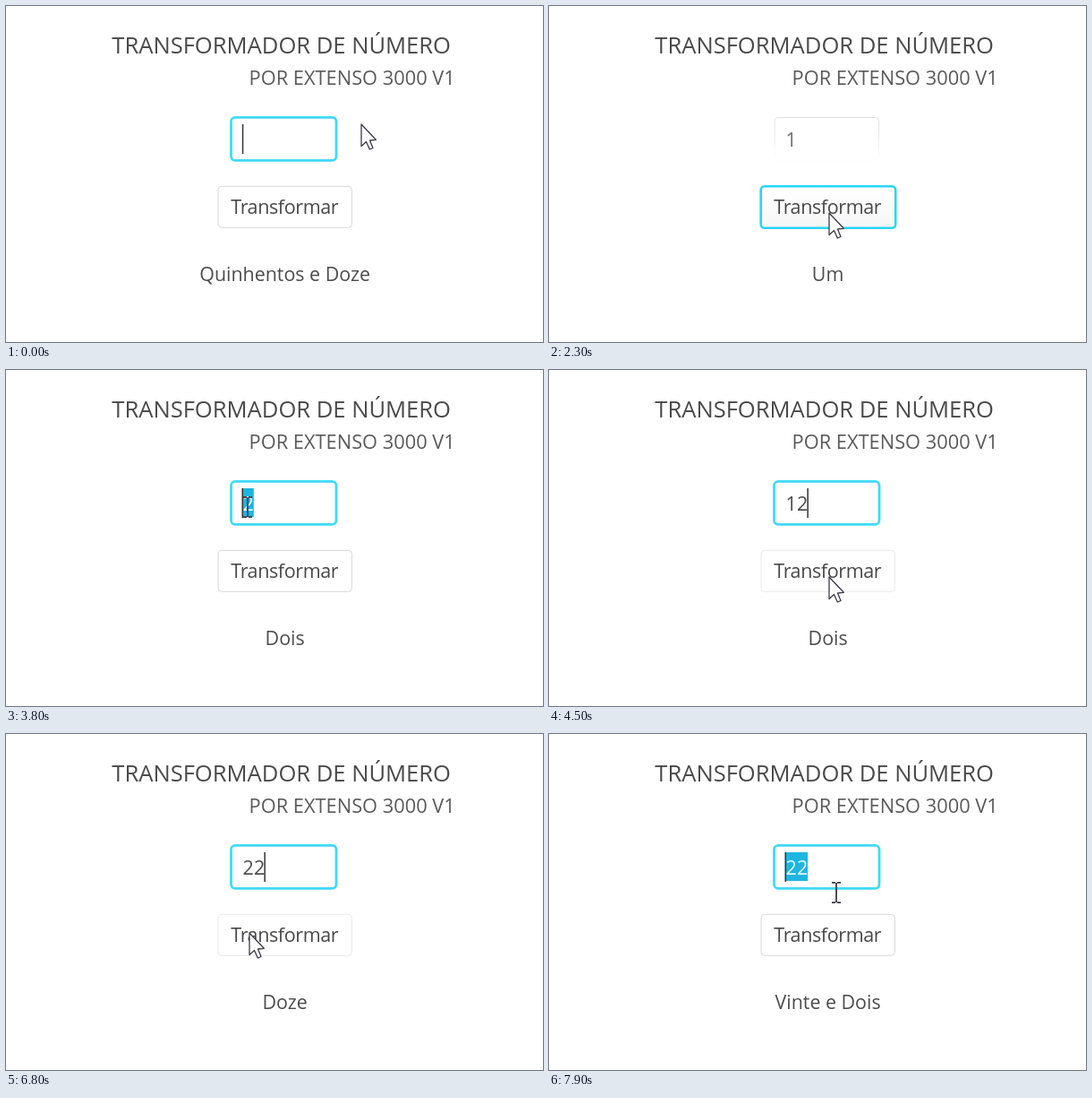
Recreate the animation shown at these times as an HTML page with a canvas. Size 600 by 375 pixels, loop 8 s.

```html
<!DOCTYPE html>
<html lang="pt">
<head>
<meta charset="utf-8">
<title>Transformador de Número</title>
<style>
  html, body { margin: 0; width: 100%; height: 100%; overflow: hidden; background: #fff; }
  canvas { display: block; width: 600px; height: 375px; }
</style>
</head>
<body>
<canvas id="stage" width="600" height="375"></canvas>
<script>
const ctx = document.getElementById('stage').getContext('2d');
const LOOP = 8000, STEP = 100;
const CYAN = '#40daf6', INK = '#4c4c4c';

// Each entry changes part of the form state; phase shifts the caret blink.
const states = [
  { at: 0, text: '', result: 'Quinhentos e Doze', field: true, phase: 200 },
  { at: 1700, text: '1' },
  { at: 2100, field: false, pressed: true },
  { at: 2300, result: 'Um', pressed: false },
  { at: 2600, field: true },
  { at: 2700, selected: true },
  { at: 2900, text: '2', selected: false },
  { at: 3100, field: false, pressed: true },
  { at: 3300, result: 'Dois', pressed: false },
  { at: 3600, field: true },
  { at: 3800, selected: true },
  { at: 4100, text: '1', selected: false },
  { at: 4300, text: '12' },
  { at: 4700, field: false, pressed: true },
  { at: 4900, result: 'Doze', pressed: false },
  { at: 5200, field: true },
  { at: 5300, selected: true, phase: 500 },
  { at: 6000, text: '2', selected: false },
  { at: 6400, text: '22' },
  { at: 7100, field: false, pressed: true },
  { at: 7200, result: 'Vinte e Dois', pressed: false },
  { at: 7600, field: true },
  { at: 7700, selected: true }
];

// Pointer path: time, x, y, shape (a = arrow, i = text beam).
const path = [
  [0, 397, 132, 'a'], [300, 404, 131, 'a'], [700, 404, 132, 'a'],
  [1000, 396, 134, 'a'], [1300, 384, 137, 'a'], [1400, 374, 138, 'i'],
  [1600, 345, 146, 'i'], [1800, 325, 190, 'a'], [2000, 314, 226, 'a'],
  [2400, 312, 232, 'a'], [2600, 296, 152, 'i'], [2800, 256, 153, 'i'],
  [2900, 268, 160, 'i'], [3000, 303, 222, 'a'], [3100, 311, 241, 'a'],
  [3400, 311, 240, 'a'], [3600, 297, 152, 'i'], [3900, 256, 154, 'i'],
  [4100, 266, 160, 'i'], [4200, 290, 195, 'a'], [4500, 313, 231, 'a'],
  [4900, 313, 233, 'a'], [5200, 294, 152, 'i'], [5400, 254, 158, 'i'],
  [5700, 251, 160, 'i'], [5800, 246, 165, 'a'], [6200, 246, 165, 'a'],
  [6500, 256, 202, 'a'], [6800, 272, 222, 'a'], [7000, 290, 230, 'a'],
  [7300, 290, 232, 'a'], [7500, 294, 195, 'a'], [7600, 297, 150, 'i'],
  [7700, 256, 149, 'i'], [7800, 262, 155, 'i'], [7900, 321, 177, 'i']
];

function stateAt(t) {
  const state = {};
  for (const change of states) {
    if (change.at <= t) Object.assign(state, { phase: 0 }, change);
  }
  state.caret = state.field && (t - state.at + state.phase) % 1000 < 500;
  return state;
}

function pointerAt(t) {
  const i = path.findLastIndex(key => key[0] <= t);
  const [t0, x0, y0, shape] = path[i];
  const [t1, x1, y1] = path[i + 1] || [LOOP, x0, y0];
  const k = (t - t0) / (t1 - t0);
  return { x: x0 + (x1 - x0) * k, y: y0 + (y1 - y0) * k, shape };
}

function label(text, x, y, size, color = INK, align = 'left') {
  ctx.font = `${size}px "Open Sans", "Noto Sans", sans-serif`;
  ctx.textAlign = align;
  ctx.fillStyle = color;
  ctx.fillText(text, x, y);
}

function box(x, y, w, h, r, stroke, width, fill = '#fff') {
  ctx.beginPath();
  ctx.roundRect(x, y, w, h, r);
  ctx.fillStyle = fill;
  ctx.fill();
  ctx.strokeStyle = stroke;
  ctx.lineWidth = width;
  ctx.stroke();
}

function fade(y0, y1, from, to) {
  const g = ctx.createLinearGradient(0, y0, 0, y1);
  g.addColorStop(0, from);
  g.addColorStop(1, to);
  return g;
}

function drawField({ text, field, selected, caret }) {
  if (field) box(251.5, 124.3, 117.5, 48, 4.5, CYAN, 2.8);
  else box(252.2, 124.5, 116.3, 48, 4, fade(124, 170, '#dedede', '#fdfdfd'), 1);

  const digits = text.length * 12.3;
  if (selected) {
    ctx.fillStyle = '#1cb6e2';
    ctx.fillRect(264.5, 132, digits, 32);
  }
  const color = selected ? '#e9faff' : field ? INK : '#707070';
  label(text, 264.6, 157, 21.5, color);
  if (caret) {
    ctx.fillStyle = '#333';
    ctx.fillRect(selected ? 263.5 : 263.8 + digits, 132, 1.5, 33);
  }
}

function drawButton({ field, pressed }, pointer) {
  const hover = pointer.shape === 'a' && pointer.x > 237 && pointer.x < 386
    && pointer.y > 201 && pointer.y < 247;
  if (field) box(237, 201.3, 149.4, 46, 4, hover ? '#e9e9e9' : '#d8d8d8', 1);
  else box(236.7, 201.2, 150.5, 46.6, 4, '#2ad5f6', 2.6,
    fade(203, 247, '#fff', pressed ? '#e6e6e6' : '#f6f6f6'));
  ctx.letterSpacing = '-0.4px';
  label('Transformar', 311.2, 232, 21.5, '#484848', 'center');
  ctx.letterSpacing = '0px';
}

function drawPointer({ x, y, shape }) {
  ctx.save();
  ctx.translate(Math.round(x), Math.round(y));
  ctx.strokeStyle = '#3a3a44';
  ctx.beginPath();
  if (shape === 'i') {
    ctx.lineWidth = 1.8;
    ctx.moveTo(0, -11);
    ctx.lineTo(0, 11);
    for (const end of [-11.2, 11.2]) {
      ctx.moveTo(-5, end);
      ctx.lineTo(-1, end);
      ctx.moveTo(1, end);
      ctx.lineTo(5, end);
    }
  } else {
    ctx.lineWidth = 1.3;
    ctx.lineJoin = 'round';
    const outline = [[0, 0], [0, 24.5], [5.5, 19.5], [9.3, 28],
      [13, 26.5], [9.5, 18], [16.3, 17.3]];
    for (const [px, py] of outline) ctx.lineTo(px, py);
    ctx.closePath();
    ctx.fillStyle = '#fff';
    ctx.fill();
  }
  ctx.stroke();
  ctx.restore();
}

function draw(t) {
  const state = stateAt(t), pointer = pointerAt(t);
  ctx.fillStyle = '#fff';
  ctx.fillRect(0, 0, 600, 375);
  label('TRANSFORMADOR DE NÚMERO', 118.3, 53, 25.55, '#4a4a4a');
  label('POR EXTENSO 3000 V1', 271.6, 88, 21.8, '#5a5a5a');
  drawField(state);
  drawButton(state, pointer);
  label(state.result, 311.6, 307, 21.4, INK, 'center');
  drawPointer(pointer);
}

const start = performance.now();
function tick() {
  const t = (performance.now() - start) % LOOP;
  draw(Math.floor(t / STEP) * STEP);
  requestAnimationFrame(tick);
}
tick();
</script>
</body>
</html>
```
